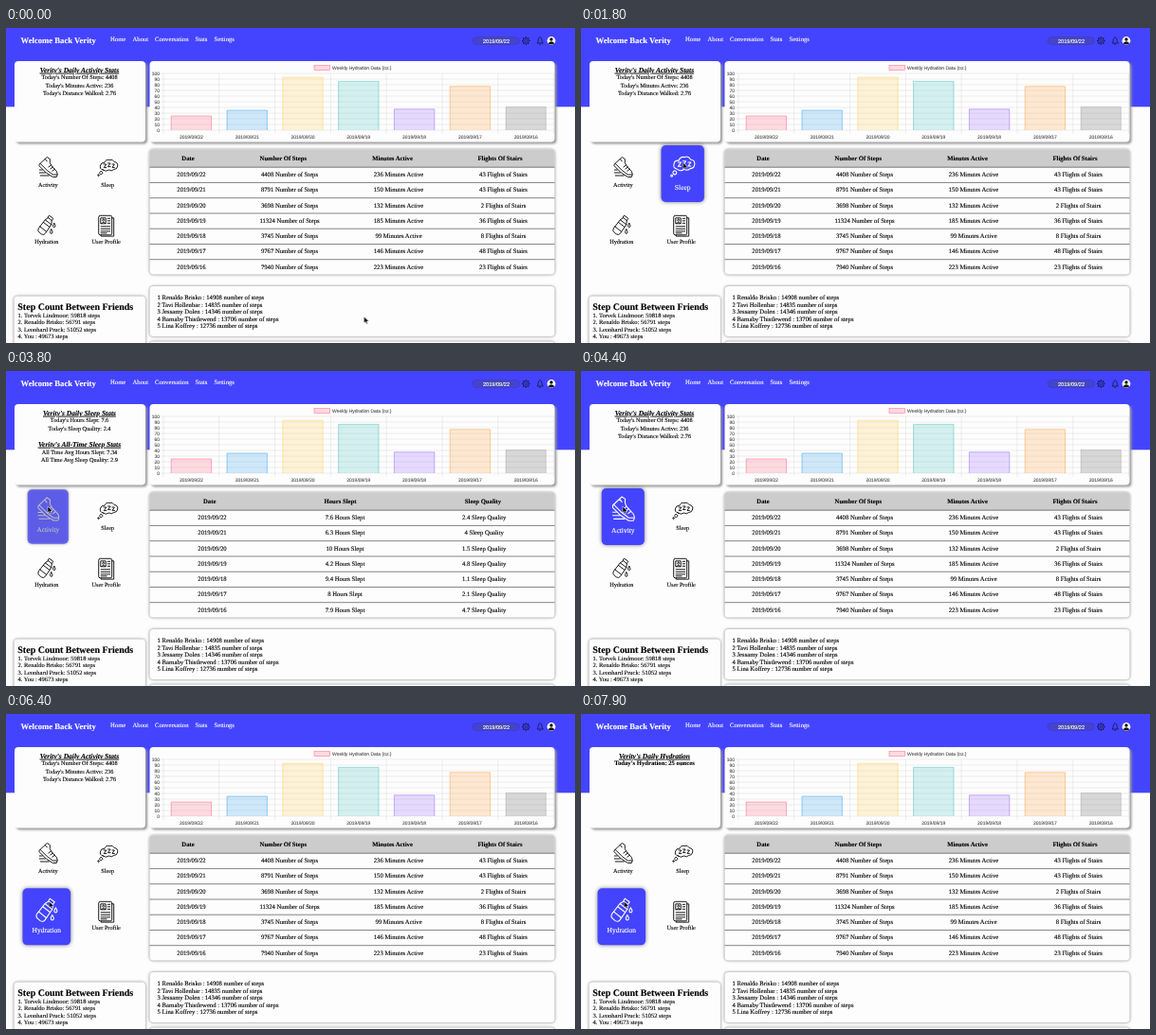
These frames come from a looping animation (600 px wide and 333 px high, 8 s). An HTML page:

```html
<!DOCTYPE html>
<html lang="en">
<head>
<meta charset="utf-8">
<title>Activity dashboard</title>
<style>
html, body { margin: 0; height: 100%; overflow: hidden; background: #fdfdfd; }
svg { display: block; width: 100vw; height: 100vh; }
text { font: 6.67px "Liberation Serif", "Times New Roman", serif; fill: currentColor; fill-opacity: 1; stroke: currentColor; stroke-width: .12; text-rendering: geometricPrecision; white-space: pre; }
.mid { text-anchor: middle; }
.end { text-anchor: end; }
.bold { font-weight: bold; }
.title { font-size: 8.67px; font-weight: bold; }
.small { font-size: 6.25px; }
.friend { font-size: 6.5px; }
.heading { font-size: 10px; font-weight: bold; }
.stat { font-size: 7.5px; font-weight: bold; font-style: italic; text-decoration: underline; }
.chart { font: 5px "Liberation Sans", Arial, sans-serif; color: #555; }
.picked { font: 5.6px "Liberation Sans", Arial, sans-serif; }
.white { color: #fff; }
.card { fill: #fdfdfd; filter: drop-shadow(.4px .5px 1.7px #777); }
.raised { fill: #fdfdfd; filter: drop-shadow(2px 2px 1px #999); }
.head { fill: #ccc; }
.line { stroke: #333; stroke-width: .6; }
.grid { stroke: #000; stroke-opacity: .14; stroke-width: .45; fill: none; }
.bar { stroke-width: .5; vector-effect: non-scaling-stroke; }

.activity-table, .sleep-table, .activity-stats, .sleep-stats, .hydration-stats { animation: 8s step-end infinite; }
.activity-table { animation-name: activity-table; }
.sleep-table, .sleep-stats { animation-name: sleep-view; }
.activity-stats { animation-name: activity-stats; }
.hydration-stats { animation-name: hydration-stats; }
@keyframes activity-table { 0%, 54.9% { opacity: 1 } 36.25% { opacity: 0 } }
@keyframes sleep-view { 0%, 54.9% { opacity: 0 } 36.25% { opacity: 1 } }
@keyframes activity-stats { 0%, 54.9% { opacity: 1 } 36.25%, 84.75% { opacity: 0 } }
@keyframes hydration-stats { 0% { opacity: 0 } 84.75%, 100% { opacity: 1 } }

.bars { transform-origin: 0 108px; animation: grow 8s linear infinite; }
@keyframes grow {
  0%, 84.74% { transform: scaleY(1) }
  84.75% { transform: scaleY(0); animation-timing-function: cubic-bezier(.165, .84, .44, 1) }
  97.25%, 100% { transform: scaleY(1) }
}

.tile { color: #000; fill-opacity: 0; animation: 8s ease infinite; }
.tile .back { fill: #4444ff; filter: drop-shadow(0 0 1.6px rgba(0, 0, 0, .5)); }
.icon { fill: none; stroke: currentColor; stroke-width: .9; stroke-linecap: round; stroke-linejoin: round; }
.sleep { animation-name: hover-sleep; }
.shoe { animation-name: hover-shoe; }
.water { animation-name: hover-water; }
@keyframes hover-sleep {
  0%, 20.2%, 46.5%, 100% { transform: scale(1); color: #000; fill-opacity: 0 }
  22.4%, 43.75% { transform: scale(1.2); color: #fff; fill-opacity: 1 }
}
@keyframes hover-shoe {
  0%, 46%, 76.25%, 100% { transform: scale(1); color: #000; fill-opacity: 0 }
  49.4%, 73.1% { transform: scale(1.2); color: #fff; fill-opacity: 1 }
}
@keyframes hover-water {
  0%, 76%, 100% { transform: scale(1); color: #000; fill-opacity: 0 }
  79.8%, 99.99% { transform: scale(1.2); color: #fff; fill-opacity: 1 }
}

.cursor { fill: #000; stroke: #fff; stroke-width: .5; animation: travel 8s ease-in-out infinite; }
@keyframes travel {
  0%, 1.25% { transform: translate(377.5px, 305px) }
  12.5%, 19.4% { transform: translate(185px, 164px) }
  21.9%, 42.5% { transform: translate(107.5px, 142px) }
  46.9%, 60% { transform: translate(44px, 143px) }
  62.5%, 67.5% { transform: translate(45px, 147px) }
  77.5%, 100% { transform: translate(45.5px, 198px) }
}
</style>
</head>
<body>
<script>
const user = 'Verity';
const dates = [22, 21, 20, 19, 18, 17, 16].map(day => `2019/09/${day}`);

const text = (x, y, label, style = '') => `<text x="${x}" y="${y}" class="${style}">${label}</text>`;
const box = (x, y, w, h, r, style) => `<rect x="${x}" y="${y}" width="${w}" height="${h}" rx="${r}" class="${style}"/>`;
const path = (d, style = '') => `<path d="${d}" class="${style}"/>`;
const group = (style, ...parts) => `<g class="${style}">${parts.flat(2).join('')}</g>`;
const list = (x, y, step, lines, style) => lines.map((line, i) => text(x, y + i * step, line, style)).join('');

function header() {
  const nav = [[110, 'Home'], [133.5, 'About'], [157, 'Conversation'], [199.5, 'Stats'], [219.5, 'Settings']];
  const teeth = Array.from({ length: 8 }, (_, i) =>
    `<rect x="-.6" y="-4.2" width="1.2" height="1.2" transform="rotate(${i * 45})"/>`).join('');
  return `<rect width="600" height="83.33" fill="#4444ff"/>` + group('white',
    text(15.5, 16, `Welcome Back ${user}`, 'title'),
    nav.map(([x, label]) => text(x, 14.3, label)),
    `<rect x="492" y="9.5" width="49.5" height="8" rx="4" fill="url(#pill)" stroke="#3535b0" stroke-width=".4"/>`,
    text(517, 15.5, dates[0], 'mid picked')) +
    `<g transform="translate(548.3 13.5)" fill="#15153f">${teeth}<g fill="none" stroke="#15153f" stroke-width=".7"><circle r="3"/><circle r="1.3"/></g></g>
    <path d="M560 16 Q561.3 15 561.3 12.5 Q561.5 10.5 563.2 9.5 Q564.9 10.5 565.1 12.5 Q565.1 15 566.4 16 Z M562.3 17.2 h1.8" fill="none" stroke="#15153f" stroke-width=".8"/>
    <circle cx="575" cy="13.5" r="4.4" fill="#fff"/>
    <circle cx="575" cy="12" r="1.7" fill="#111"/><path d="M571.6 16.2 Q575 12.3 578.4 16.2 Q575 19 571.6 16.2" fill="#111"/>`;
}

function stats() {
  const x = 77.5;
  return box(9, 35, 138, 85.5, 4, 'raised') +
    group('activity-stats', text(x, 46.7, `${user}'s Daily Activity Stats`, 'mid stat'),
      list(x, 54.3, 8.2, ["Today's Number Of Steps: 4408", "Today's Minutes Active: 236", "Today's Distance Walked: 2.76"], 'mid small')) +
    group('sleep-stats', text(x, 46.7, `${user}'s Daily Sleep Stats`, 'mid stat'),
      list(x, 54.3, 8.2, ["Today's Hours Slept: 7.6", "Today's Sleep Quality: 2.4"], 'mid small'),
      text(x, 79.8, `${user}'s All-Time Sleep Stats`, 'mid stat'),
      list(x, 87.7, 8.2, ['All Time Avg Hours Slept: 7.34', 'All Time Avg Sleep Quality: 2.9'], 'mid small')) +
    group('hydration-stats', text(x, 46.7, `${user}'s Daily Hydration`, 'mid stat'),
      text(x, 54.4, "Today's Hydration: 25 ounces", 'mid bold'));
}

function chart() {
  const left = 166, base = 108, pitch = 58.8, width = 42.4;
  const ounces = [25, 35, 93, 86, 37, 77, 41];
  const colors = ['255,99,132', '54,162,235', '255,206,86', '75,192,192', '153,102,255', '255,159,64', '90,90,90'];
  const rows = Array.from({ length: 11 }, (_, i) => base - i * 6);
  const bars = ounces.map((value, i) => {
    const x = left + pitch * (i + .5) - width / 2, top = base - value * .6;
    return `<path class="bar" d="M${x} ${base}V${top}h${width}V${base}" fill="rgba(${colors[i]},.23)" stroke="rgb(${colors[i]})" stroke-opacity="${i < 6 ? 1 : .4}"/>`;
  });
  return box(151.5, 35, 427, 85.5, 4, 'raised') +
    `<rect x="325" y="39.6" width="16.6" height="5" fill="rgba(255,99,132,.23)" stroke="rgb(255,99,132)" stroke-width=".5"/>` +
    text(344, 43.7, 'Weekly Hydration Data (oz.)', 'chart') +
    rows.map((y, i) => path(`M162.8 ${y}H577.6`, 'grid') + text(162, y + 1.8, i * 10, 'chart end')).join('') +
    Array.from({ length: 8 }, (_, i) => path(`M${left + i * pitch} 48V112`, 'grid')).join('') +
    dates.map((date, i) => text(left + pitch * (i + .5), 116.7, date, 'chart mid')).join('') +
    group('bars', bars);
}

// Each column: heading, heading centre, cell centre, cells.
function table(style, columns) {
  return group(style, columns.map(([title, titleX, cellX, cells]) => [
    text(titleX, 139.8, title, 'mid bold'), list(cellX, 157.2, 16.25, cells, 'mid')]));
}

function tables() {
  const cells = (values, unit) => values.map(value => `${value} ${unit}`);
  return box(151.5, 128.5, 427, 132, 4, 'card') +
    path('M151.5 147.2V132.5q0 -4 4 -4H574.5q4 0 4 4V147.2Z', 'head') +
    Array.from({ length: 7 }, (_, i) => path(`M151.5 ${147.2 + i * 16.25}H578.5`, 'line')).join('') +
    table('activity-table', [
      ['Date', 192, 195.5, dates],
      ['Number Of Steps', 292.3, 299, cells([4408, 8791, 3698, 11324, 3745, 9767, 7940], 'Number of Steps')],
      ['Minutes Active', 407.5, 414, cells([236, 150, 132, 185, 99, 146, 223], 'Minutes Active')],
      ['Flights Of Stairs', 521, 524.5, cells([43, 43, 2, 36, 8, 48, 23], 'Flights of Stairs')]]) +
    table('sleep-table', [
      ['Date', 214.7, 217.5, dates],
      ['Hours Slept', 352.5, 357.5, cells([7.6, 6.3, 10, 4.2, 9.4, 8, 7.9], 'Hours Slept')],
      ['Sleep Quality', 503, 504.2, cells([2.4, 4, 1.5, 4.8, 1.1, 2.1, 4.7], 'Sleep Quality')]]);
}

// Icons are drawn around the tile centre.
const icons = {
  shoe: 'M-9 -10 L-1 -17.5 L2 -15.5 Q1 -11 4 -8 L9 -2.5 Q11 1 9 3.5 H5 L-2 -1 L-9 -8 Z M-8 -10.5 L-1 -3.5 L5 1 H9.5 M-3 -15.5 L-1 -13 M3 -9 L.5 -7 M5 -7 L2.5 -5 M7 -4.8 L4.5 -2.8 M-9 -4 H-6 M-9 -1 H-3 M-8 2 H1',
  sleep: 'M-5 -4 Q-9 -5 -7.5 -9 Q-7 -12 -3.5 -11.5 Q-2 -15.5 2 -14.5 Q5 -16 7 -12.5 Q11 -12 10.5 -8 Q10 -4.5 6.5 -4.5 Q4 -2 1.5 -4 Q-2 -1.5 -5 -4 Z M-4 -10 h2.6 l-2.6 3.6 h2.6 M.3 -11 h2.6 l-2.6 3.6 h2.6 M4.8 -10 h2.4 l-2.4 3.4 h2.4 M-7 -2.5 a1.6 1.6 0 1 0 .1 0 M-9.7 1 a.8 .8 0 1 0 .1 0',
  water: 'M3 -16 L7 -13 L5.5 -10.8 L1.5 -13.8 Z M1.5 -13.5 L-1.5 -11.5 L-8.5 -2.5 Q-10 0 -7.5 2 L-5.5 3.6 Q-3 5 -1.5 3 L5 -6.5 L5.5 -10.8 M-3.5 -9 L3 -4 M-7 -4.5 L-.5 .8 M-1.5 -11.5 L5 -6.5 M8 -8 Q5.5 -4.2 8 -3.6 Q10.5 -4.2 8 -8 M5 -1.5 Q2.5 2.5 5 3.1 Q7.5 2.5 5 -1.5',
  profile: 'M-8 -14.5 Q-8 -16 -6.5 -16 H4.5 Q6 -16 6 -14.5 V3 Q6 4.5 4.5 4.5 H-6.5 Q-8 4.5 -8 3 Z M6 -13.5 H8 V5.8 H-5.5 V4.5 M-5.5 -13.5 h5 v6 h-5 Z M-3 -12.3 a1.1 1.1 0 1 0 .1 0 M-5 -7.6 q2 -3 4 0 M1.5 -13 h2.5 M1.5 -10.5 h2.5 M1.5 -8 h2.5 M-5.5 -4.5 h9.5 M-5.5 -2 h9.5 M-5.5 .5 h9.5 M-5.5 2.5 h6'
};

const tile = (x, y, width, name, label) => `<g transform="translate(${x} ${y})">${group(`tile ${name}`,
  box(-width / 2, -25, width, 50, 4, 'back'), path(icons[name], 'icon'), text(0, 14, label, 'mid small'))}</g>`;

const tiles = () => tile(44.3, 154, 37.6, 'shoe', 'Activity') + tile(107.2, 154, 37.8, 'sleep', 'Sleep') +
  tile(42.8, 214.3, 42.2, 'water', 'Hydration') + tile(105.7, 214.3, 44, 'profile', 'User Profile');

function rankings() {
  return box(8.5, 283.5, 138.5, 60, 4, 'card') + box(151.5, 273, 427, 53, 4, 'card') + box(151.5, 331.5, 427, 20, 4, 'card') +
    text(12.3, 298, 'Step Count Between Friends', 'heading') +
    list(12.5, 305.8, 7.5, ['1. Torvek Lindmoor: 59818 steps', '2. Renaldo Brisko: 56791 steps',
      '3. Leonhard Pruck: 51052 steps', '4. You : 49673 steps'], 'friend') +
    list(159.5, 287.2, 7.5, ['1 Renaldo Brisko : 14908 number of steps', '2 Tavi Hollenbar : 14835 number of steps',
      '3 Jessamy Dolen : 14346 number of steps', '4 Barnaby Thistlewend : 13706 number of steps',
      '5 Lina Koffrey : 12736 number of steps']);
}

document.body.innerHTML = `<svg viewBox="0 0 600 333" preserveAspectRatio="none">
  <defs><linearGradient id="pill"><stop stop-color="#4242d8"/><stop offset=".5" stop-color="#4a4aa8"/><stop offset="1" stop-color="#4242d8"/></linearGradient></defs>
  ${header()}${stats()}${chart()}${tables()}${rankings()}${tiles()}
  ${path('M0 0 V7 L1.6 5.5 L2.7 8 L3.9 7.5 L2.9 5.1 H5 Z', 'cursor')}
</svg>`;
</script>
</body>
</html>
```
